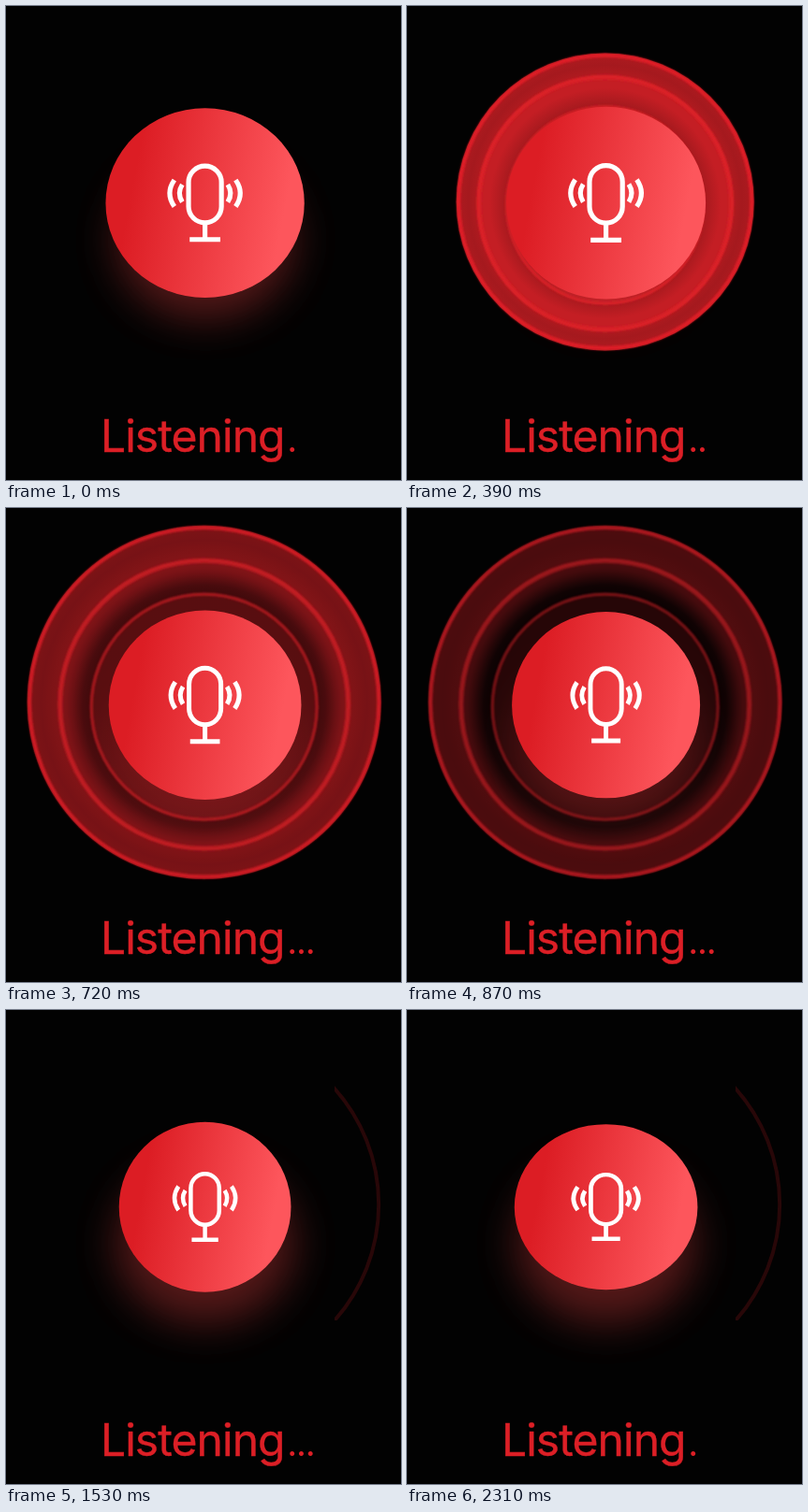
Recreate the animation shown at these times as an HTML page. Size 422 by 507 pixels, loop 2.34 s.

```html
<!DOCTYPE html>
<html lang="en">
<head>
<meta charset="utf-8">
<title>Listening</title>
<style>
  html, body { margin: 0; width: 100%; height: 100%; overflow: hidden; background: #020202; }
  svg { display: block; width: 100vw; height: 100vh; }
  text { font: 400 48px Inter, Roboto, sans-serif; fill: #dc1f26; }
  #label { letter-spacing: -0.95px; stroke: #dc1f26; stroke-width: 0.4px; }
  #dots { font-size: 38px; text-anchor: middle; }
  .line { fill: none; stroke: #e01f27; }
</style>
</head>
<body>
<svg viewBox="0 0 422 507">
  <defs>
    <linearGradient id="red" x1="0.06" y1="0.42" x2="0.94" y2="0.58">
      <stop offset="0.08" stop-color="#dc1d24"/>
      <stop offset="0.95" stop-color="#fd565c"/>
    </linearGradient>
    <linearGradient id="well" x2="0" y2="1">
      <stop offset="0.5" stop-color="#a81a1e"/>
      <stop offset="1" stop-color="#c02227"/>
    </linearGradient>
    <radialGradient id="rim">
      <stop offset="0.8" stop-color="#b81c21"/>
      <stop offset="0.92" stop-color="#a5191e"/>
      <stop offset="1" stop-color="#ae1b20"/>
    </radialGradient>
    <radialGradient id="bowl">
      <stop offset="0.72" stop-color="#9a181c"/>
      <stop offset="0.9" stop-color="#c41e24"/>
      <stop offset="1" stop-color="#c41e24"/>
    </radialGradient>
    <radialGradient id="dark">
      <stop offset="0.76" stop-opacity="0.5"/>
      <stop offset="0.79" stop-opacity="0.85"/>
      <stop offset="0.83" stop-opacity="0.8"/>
      <stop offset="0.94" stop-opacity="0.25"/>
      <stop offset="1" stop-opacity="0.1"/>
    </radialGradient>
    <filter id="haze" x="-50%" y="-50%" width="200%" height="200%"><feGaussianBlur stdDeviation="22"/></filter>
    <filter id="soft"><feGaussianBlur stdDeviation="0.8"/></filter>
    <clipPath id="side"><rect x="351" y="80" width="60" height="252"/></clipPath>
  </defs>

  <rect width="422" height="507" fill="#020202"/>
  <ellipse cx="213" cy="250" rx="95" ry="85" fill="#dc3c3e" opacity="0.38" filter="url(#haze)"/>

  <g id="fills">
    <circle id="outer" cx="211.7" fill="url(#rim)"/>
    <circle id="middle" cx="211.7" fill="url(#bowl)"/>
    <circle id="inner" cx="211.7" fill="url(#well)"/>
    <circle id="shade" cx="211.7" cy="212" r="156" fill="url(#dark)"/>
  </g>
  <g id="lines" class="line" filter="url(#soft)">
    <circle id="outerLine" cx="211.7" stroke-width="4"/>
    <circle id="middleLine" cx="211.7" stroke-width="5" stroke-opacity="0.75"/>
    <circle id="innerLine" cx="211.7" stroke-width="3" stroke-opacity="0.75"/>
  </g>
  <g id="trace" clip-path="url(#side)">
    <circle class="line" cx="211.7" cy="208" r="186.5" stroke-width="4" stroke-opacity="0.17"/>
  </g>

  <g id="button">
    <ellipse rx="107" ry="103.5" fill="url(#red)"/>
    <g fill="none" stroke="#fff" stroke-width="5.2" transform="translate(0 -0.6)">
      <rect x="-17.7" y="-39.8" width="35.4" height="62" rx="17.7"/>
      <path d="M0 22V38M-16.5 40.5H16.5"/>
      <path id="waves" d="M-33 -24.5Q-43 -10 -33 4.5M-24.5 -19.5Q-30.5 -10 -24.5 -0.5"/>
      <use href="#waves" transform="scale(-1 1)"/>
    </g>
  </g>

  <text id="label" x="101" y="477">Listening</text>
  <text id="dots" x="305.8 315.5 325.2 334.9" y="477">.</text>
</svg>
<script>
const LOOP = 2340, STEP = 30;

// Rings leave the button's edge and settle at radius r, height y.
const rings = [
  { id: 'outer', from: 60, to: 545, r: 189, y: 207.8, inset: 2.3 },
  { id: 'middle', from: 100, to: 520, r: 156, y: 210.3, inset: 2 },
  { id: 'inner', from: 300, to: 510, r: 121.5, y: 212.7, inset: 1 }
];

const ramp = (t, from, to) => Math.min(1, Math.max(0, (t - from) / (to - from)));
const mix = (a, b, p) => a + (b - a) * p;
const wave = (t, mid, amp, peak, period) =>
  mid + amp * Math.cos((t - peak) / period * 2 * Math.PI);

const el = id => document.getElementById(id);

function set(id, attrs) {
  for (const key in attrs) el(id).setAttribute(key, attrs[key]);
}

function draw(t) {
  for (const { id, from, to, r, y, inset } of rings) {
    const p = ramp(t, from, to);
    const radius = mix(95, r, p), cy = mix(213, y, p);
    set(id, { r: radius, cy });
    set(id + 'Line', { r: radius - inset, cy });
  }

  const fade = t < 60 ? 0 : 1 - ramp(t, 570, 1110);
  set('fills', { opacity: fade });
  set('lines', { opacity: Math.sqrt(fade) });
  set('shade', { opacity: ramp(t, 540, 870) });
  set('trace', { opacity: t >= 1110 ? 1 : 0 });

  const sx = wave(t, 99.25, 7.75, 220, 2900) / 107;
  const sy = wave(t, 95.3, 7.6, 350, 3400) / 103.5;
  set('button', { transform: `translate(212.6 210.7) scale(${sx} ${sy})` });

  const beat = Math.floor(t / 330);
  el('dots').textContent = '.'.repeat(Math.max(1, 4 - Math.abs(beat - 3)));
}

const start = performance.now();
function tick() {
  const t = Math.max(0, performance.now() - start) % LOOP;
  draw(t < 60 ? 0 : Math.floor(t / STEP) * STEP);
  requestAnimationFrame(tick);
}
tick();
</script>
</body>
</html>
```
